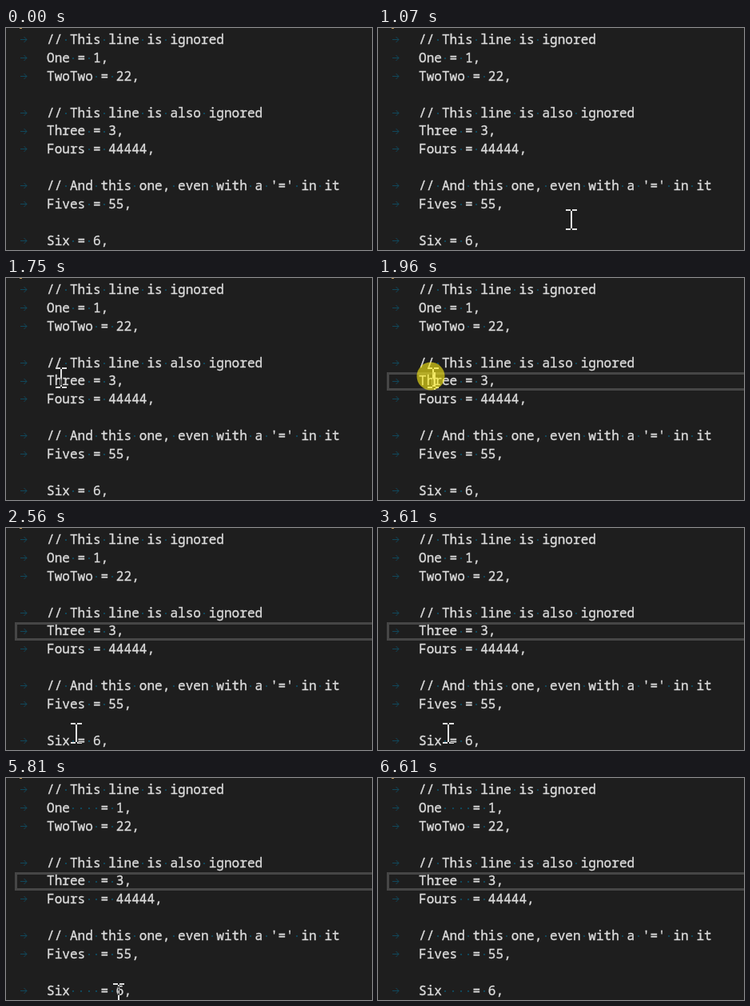
Recreate the animation shown at these times as an HTML page with a canvas. Size 458 by 278 pixels, loop 7210 ms.

```html
<!DOCTYPE html>
<html lang="en">
<head>
<meta charset="utf-8">
<title>Align assignments</title>
<style>
  html, body { margin: 0; width: 100%; height: 100%; overflow: hidden; background: #1e1e1e; }
  canvas { display: block; width: 458px; height: 278px; }
</style>
</head>
<body>
<canvas id="stage" width="458" height="278"></canvas>
<script>
const ctx = document.getElementById('stage').getContext('2d');
const LOOP = 7210, W = 458, H = 278;
const LEFT = 51, CELL = 9.65, PITCH = 22.88;
const BG = '#1e1e1e', INK = '#dcdcdc', FAINT = '#10485c', LINE = '#464646';
const CLICK = 1960, ALIGN = 4010, EXIT = 5810;

// An array holds name and value of an assignment
const lines = [
  '// This line is ignored', ['One', '1,'], ['TwoTwo', '22,'], '',
  '// This line is also ignored', ['Three', '3,'], ['Fours', '44444,'], '',
  "// And this one, even with a '=' in it", ['Fives', '55,'], '', ['Six', '6,']
];

const enterTimes = [1000, 1070, 1140, 1260, 1330, 1400, 1470, 1540, 1610, 1680];
const blinks = [CLICK, 2560, 3080, 3610, ALIGN, 4470, 5020, 5550, 6080, 6610];

const mix = (a, b, p) => a + (b - a) * p;
const along = (a, b, p) => [Math.round(mix(a[0], b[0], p)), Math.round(mix(a[1], b[1], p))];

function pointer(t) {
  const click = [69, 125], rest = [88, 257];
  if (t < 1000 || t >= EXIT + 70) return null;
  if (t < 1750) {
    const now = enterTimes.filter(v => v <= t).pop();
    const u = (now - 1000) / 680;
    return along([278, 264], [72, 131], 1 - Math.pow(1 - u, 1.79));
  }
  if (t < 2080) return click;
  if (t < 2150) return along(click, rest, 0.4);
  if (t < 2220) return along(click, rest, 0.85);
  return t < EXIT ? rest : [141, 270];
}

function rect(color, x, y, w, h) {
  ctx.fillStyle = color;
  ctx.fillRect(x, y, w, h);
}

function drawArrow(y) {
  ctx.strokeStyle = FAINT;
  ctx.lineWidth = 1;
  ctx.beginPath();
  ctx.moveTo(18, y);
  ctx.lineTo(26, y);
  ctx.moveTo(22.5, y - 3.5);
  ctx.lineTo(26, y);
  ctx.lineTo(22.5, y + 3.5);
  ctx.stroke();
}

function drawWord(word, x, y) {
  ctx.fillStyle = ctx.strokeStyle = INK;
  ctx.lineWidth = 0.35;
  ctx.fillText(word, x, y);
  ctx.strokeText(word, x, y);
}

function drawLine(item, row, aligned) {
  if (!item) return;
  const base = Math.round(20 + row * PITCH);
  const mid = Math.floor(14.6 + row * PITCH);
  const text = typeof item === 'string' ? item
    : item[0].padEnd(aligned ? 7 : item[0].length + 1) + '= ' + item[1];
  drawArrow(mid + 0.5);
  let col = 0;
  for (const word of text.split(' ')) {
    drawWord(word, LEFT + col * CELL, base);
    col += word.length;
    if (col < text.length) rect(FAINT, Math.floor(LEFT + (col + 0.5) * CELL) - 1, mid, 2, 2);
    col++;
  }
}

// The text pointer inverts whatever lies below it
function drawPointer(x, y) {
  ctx.globalCompositeOperation = 'difference';
  for (const top of [y - 13, y + 11]) {
    rect('#fff', x - 7, top, 6, 2);
    rect('#fff', x + 1, top, 6, 2);
  }
  rect('#fff', x - 1, y - 11, 2, 22);
  ctx.globalCompositeOperation = 'source-over';
}

function draw(t) {
  rect(BG, 0, 0, W, H);
  rect('#c09a5c', 17, 0, 3, 1);

  if (t >= CLICK) {
    ctx.strokeStyle = LINE;
    ctx.lineWidth = 3;
    ctx.strokeRect(12.5, 119.5, W, 20);
  }

  ctx.font = '16.08px "Noto Sans Mono", "DejaVu Sans Mono", monospace';
  ctx.textBaseline = 'alphabetic';
  lines.forEach((item, row) => drawLine(item, row, t >= ALIGN));

  if (blinks.filter(v => v <= t).length % 2) rect(INK, 70, 118, 2, 22);

  const at = pointer(t);
  if (at) drawPointer(at[0], at[1]);

  if (t >= CLICK && t < 2080) {
    ctx.fillStyle = 'rgba(255, 240, 20, 0.6)';
    ctx.beginPath();
    ctx.arc(66, 123, 17.5, 0, Math.PI * 2);
    ctx.fill();
  }
}

const start = performance.now();
function tick() {
  draw((performance.now() - start) % LOOP);
  requestAnimationFrame(tick);
}
tick();
</script>
</body>
</html>
```
